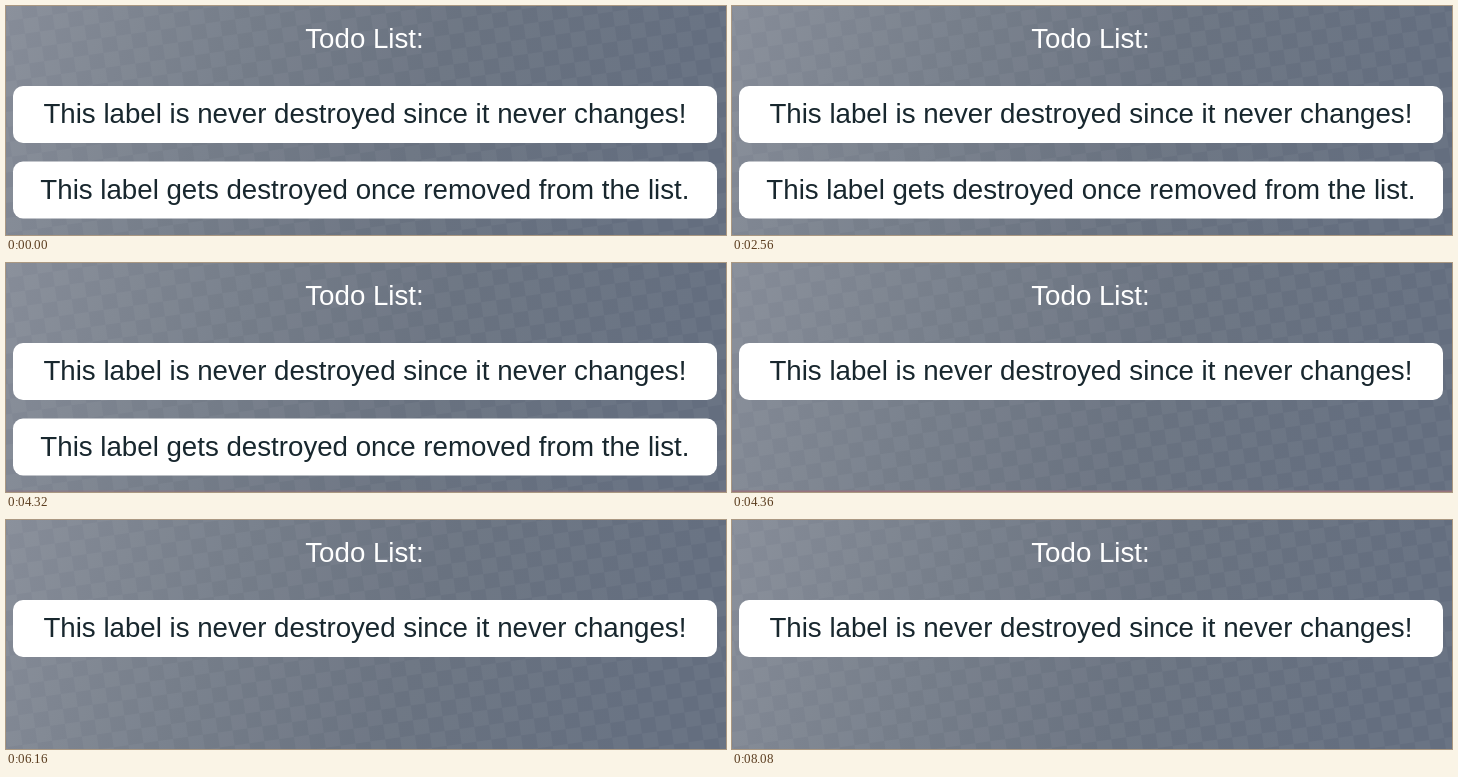
Recreate the animation shown at these times as an HTML page. Size 720 px wide and 229 px high, loop 8640 ms.

```html
<!DOCTYPE html>
<html lang="en">
<head>
<meta charset="utf-8">
<title>Todo List</title>
<style>
  html, body { margin: 0; width: 100%; height: 100%; overflow: hidden; background: #717987; }
  svg { display: block; width: 720px; height: 229px; }
  text {
    font: 27.68px "Liberation Sans", Arial, sans-serif;
    text-anchor: middle;
    fill: #18272e;
  }
  .title { fill: #fff; }
  .box { fill: #fff; }
  .removed { animation: remove 8640ms step-end infinite; }
  .edge { fill: #96747f; opacity: 0; animation: edge 8640ms linear infinite; }

  /* The second label goes at 4360 ms. */
  @keyframes remove {
    0% { visibility: visible; }
    50.463%, 100% { visibility: hidden; }
  }
  /* The edge shows at 3360 ms, brightens with the removal, and glows again at 7200 ms. */
  @keyframes edge {
    0%, 38.888% { opacity: 0; }
    38.889%, 50.462% { opacity: .5; }
    50.463%, 61.111% { opacity: 1; }
    66.667%, 83.332% { opacity: 0; }
    83.333% { opacity: .5; }
    88.889%, 100% { opacity: 0; }
  }
</style>
</head>
<body>
<svg viewBox="0 0 720 229">
  <defs>
    <linearGradient id="slate" gradientUnits="userSpaceOnUse" x1="0" y1="0" x2="620" y2="229">
      <stop offset="0" stop-color="#868c98"/>
      <stop offset=".35" stop-color="#757d89"/>
      <stop offset=".65" stop-color="#697280"/>
      <stop offset="1" stop-color="#646e7f"/>
    </linearGradient>
    <pattern id="checker" width="30" height="30" patternUnits="userSpaceOnUse" patternTransform="rotate(-8)">
      <path d="M0 0h15v15H0zM15 15h15v15H15z" fill="#fff" fill-opacity=".04"/>
    </pattern>
  </defs>

  <rect width="720" height="229" fill="url(#slate)"/>
  <rect width="720" height="229" fill="url(#checker)"/>
  <rect class="edge" y="227.5" width="720" height="1.5"/>

  <text class="title" x="358.5" y="42">Todo List:</text>
  <g>
    <rect class="box" x="7" y="80" width="704" height="57" rx="10"/>
    <text x="358.9" y="117">This label is never destroyed since it never changes!</text>
  </g>
  <g class="removed">
    <rect class="box" x="7" y="155.5" width="704" height="57" rx="10"/>
    <text x="358.9" y="193">This label gets destroyed once removed from the list.</text>
  </g>
</svg>
</body>
</html>
```
